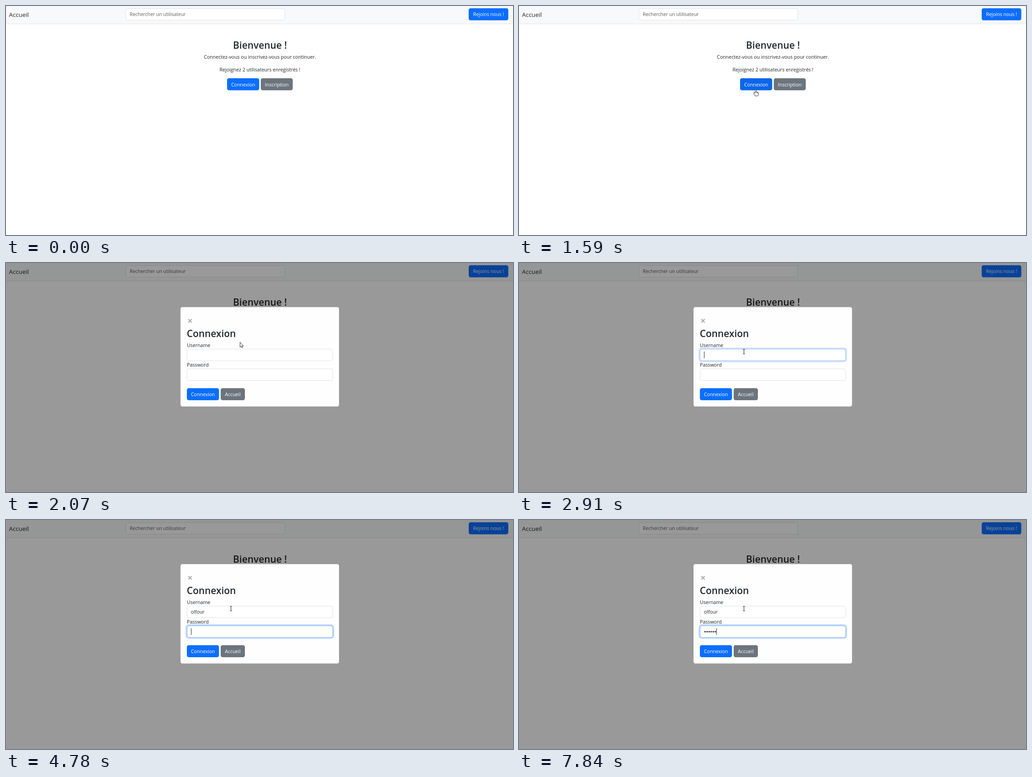
An HTML page that plays this animation: 1110 px wide and 504 px high, repeating every 8 s.

```html
<!DOCTYPE html>
<html lang="fr">
<head>
<meta charset="utf-8">
<title>Connexion</title>
<style>
  html, body { margin: 0; width: 100%; height: 100%; overflow: hidden; background: #fff; }
  svg { display: block; width: 1110px; height: 504px; }
  text { font: 10.6px "Open Sans", "Noto Sans", sans-serif; fill: #212529; white-space: pre; }
  .mid { text-anchor: middle; }
  .title { font-size: 20.9px; font-weight: 600; }
  .brand { font-size: 13.3px; }
  .hint { font-size: 10.45px; fill: #595c5f; }
  .light { fill: #fff; font-size: 10.5px; font-weight: 500; }
  .blue { fill: #0d6efd; }
  .gray { fill: #6c757d; }
  .field { fill: #fff; stroke: #dee2e6; }
  .ring { fill: none; stroke: #0d6efd; stroke-opacity: .25; stroke-width: 2.8; }
  .edge { fill: none; stroke: #86b7fe; }
  .cursor { fill: #fff; stroke: #000; stroke-width: .8; stroke-linejoin: round; }
</style>
</head>
<body>
<svg viewBox="0 0 1110 504">
  <defs>
    <filter id="soft" x="-5%" y="-20%" width="110%" height="150%">
      <feDropShadow dx="0" dy="1.4" stdDeviation="1.4" flood-color="#000" flood-opacity=".1"/>
    </filter>
  </defs>
  <rect width="1110" height="504" fill="#fff"/>
  <rect x="-10" y="-10" width="1130" height="47.6" fill="#f8f9fa" filter="url(#soft)"/>
  <text class="brand" x="6.5" y="23.5">Accueil</text>
  <rect class="field" x="262.5" y="5.5" width="348" height="25.7" rx="4"/>
  <text class="hint" x="271" y="22.4">Rechercher un utilisateur</text>
  <rect class="blue" x="1013" y="5" width="86.7" height="26.4" rx="4.2"/>
  <text class="mid light" x="1056.4" y="22.4">Rejoins nous !</text>

  <text class="title mid" x="556" y="93.5">Bienvenue !</text>
  <text class="mid" x="556" y="116">Connectez-vous ou inscrivez-vous pour continuer.</text>
  <text class="mid" x="556" y="144">Rejoignez 2 utilisateurs enregistrés !</text>
  <rect id="login" class="blue" x="484" y="159" width="70.3" height="26.5" rx="4.2"/>
  <text class="mid light" x="519.2" y="176.6">Connexion</text>
  <rect class="gray" x="557.8" y="159" width="70" height="26.5" rx="4.2"/>
  <text class="mid light" x="592.8" y="176.6">Inscription</text>

  <rect id="shade" width="1110" height="504" fill-opacity=".4"/>

  <g id="modal">
    <rect x="381.6" y="96.6" width="348.1" height="219.7" rx="4.8" fill="#fefefe" stroke="#888" stroke-width=".8"/>
    <path d="M399.2 123.6l7.4 7.4m0-7.4l-7.4 7.4" stroke="#aaa" stroke-width="2.1"/>
    <text class="title" x="395.8" y="162.5">Connexion</text>
    <text x="396" y="185">Username</text>
    <rect class="field" x="396.4" y="189.4" width="318.8" height="25.7" rx="4"/>
    <text x="396" y="228">Password</text>
    <rect class="field" x="396.4" y="232.8" width="318.8" height="25.7" rx="4"/>
    <g id="focusUser">
      <rect class="ring" x="394.6" y="187.6" width="322.3" height="29.2" rx="5.6"/>
      <rect class="edge" x="396.4" y="189.4" width="318.8" height="25.7" rx="4"/>
    </g>
    <g id="focusPass">
      <rect class="ring" x="394.6" y="231" width="322.3" height="29.2" rx="5.6"/>
      <rect class="edge" x="396.4" y="232.8" width="318.8" height="25.7" rx="4"/>
    </g>
    <text id="user" x="404.8" y="206.4"></text>
    <g id="dots" fill="#212529"></g>
    <rect id="caret" width="1" height="14.4" fill="#212529"/>
    <rect class="blue" x="396" y="275.4" width="70.3" height="26.5" rx="4.2"/>
    <text class="mid light" x="431.2" y="293">Connexion</text>
    <rect class="gray" x="470" y="275.4" width="53" height="26.5" rx="4.2"/>
    <text class="mid light" x="496.4" y="293">Accueil</text>
  </g>

  <circle id="click" r="8.5" fill="#f0f000" fill-opacity=".5"/>
  <path id="arrow" class="cursor" d="M.4.4V11.4L2.8 9.2 4.4 12.6 5.9 11.9 4.4 8.5H7.8Z"/>
  <g id="hand" class="cursor">
    <path d="M-1.2 9V1.1a1.2 1.2 0 0 1 2.4 0V6l1.9.4q.8-.2 1.6.5q1.3.1 1.5 1.5v3.4l-1.3 3.2H-.9L-4.4 9.2q-.3-1.6 1.2-1.4z"/>
    <path d="M1.2 6v2.6M3.1 6.4v2.4M4.7 6.9v2.2" fill="none" stroke-width=".6"/>
  </g>
  <path id="beam" fill="none" stroke="#000" stroke-width=".9"
    d="M-2.3-5H-.6L0-4.6.6-5H2.3M0-4.6V4.6M-2.3 5H-.6L0 4.6.6 5H2.3"/>
</svg>
<script>
const LOOP = 8000;
const NAME = "olfour";
const nameKeys = [3640, 3790, 3980, 4110, 4190, 4310];
const passKeys = [5810, 6190, 6640, 7040, 7380, 7840];
const DOT = 4.5;

// Pointer moves: start, end, steps, from, to, easing power for x and y
const moves = [
  { t0: 120, t1: 400, n: 5, from: [1061, 480], to: [878, 269], ease: [1.8, 1.8] },
  { t0: 740, t1: 1540, n: 13, from: [850, 263], to: [520, 187], ease: [3.4, 1.13] },
  { t0: 1590, t1: 2000, n: 7, from: [518, 183], to: [513.5, 174], ease: [2, 2] },
  { t0: 2070, t1: 2071, n: 2, from: [512, 174], to: [512, 174], ease: [1, 1] },
  { t0: 2510, t1: 2630, n: 3, from: [506, 181], to: [492.5, 195], ease: [1.3, 1] }
];

const ui = {};
document.querySelectorAll("[id]").forEach(el => ui[el.id] = el);

const dots = NAME.split("").map((_, i) => {
  const dot = document.createElementNS("http://www.w3.org/2000/svg", "circle");
  dot.setAttribute("cx", 407.3 + DOT * i);
  dot.setAttribute("cy", 245.8);
  dot.setAttribute("r", 1.65);
  return ui.dots.appendChild(dot);
});

const set = (el, name, value) => el.setAttribute(name, value);
const show = (el, on) => set(el, "visibility", on ? "inherit" : "hidden");
const within = (t, a, b) => t >= a && t < b;
const pressed = (keys, t) => keys.filter(k => k <= t).length;

// Progress from 0 to 1 in n held positions
function stepped(t, t0, t1, n) {
  const p = Math.min(1, Math.max(0, (t - t0) / (t1 - t0)));
  return Math.floor(p * (n - 1) + 1e-6) / (n - 1);
}

function pointerAt(t) {
  const m = moves.filter(move => move.t0 <= t).pop();
  if (!m) return null;
  const p = stepped(t, m.t0, m.t1, m.n);
  return m.from.map((a, i) => a + (m.to[i] - a) * (1 - Math.pow(1 - p, m.ease[i])));
}

function drawPointer(t) {
  const pos = pointerAt(t);
  const hand = within(t, 1590, 2070);
  const beam = t >= 2630;
  show(ui.arrow, pos && !hand && !beam);
  show(ui.hand, hand);
  show(ui.beam, beam);
  if (pos) {
    for (const el of [ui.arrow, ui.hand, ui.beam]) set(el, "transform", `translate(${pos})`);
  }
  show(ui.click, within(t, 1930, 2070) || within(t, 2790, 2910));
  set(ui.click, "transform", t < 2070 ? "translate(512 173.7)" : "translate(492.5 195)");
}

function drawForm(t) {
  const inUser = within(t, 2790, 4660);
  const inPass = t >= 4660;
  const userGlow = t < 2790 ? 0 : 0.25 + 0.75 * stepped(t, 2790, 2970, 4);
  const passGlow = t < 4660 ? 0 : 0.3 + 0.7 * stepped(t, 4660, 4780, 3);
  set(ui.focusUser, "opacity", inPass ? 1 - passGlow : userGlow);
  set(ui.focusPass, "opacity", passGlow);

  ui.user.textContent = NAME.slice(0, pressed(nameKeys, t));
  const count = pressed(passKeys, t);
  dots.forEach((dot, i) => show(dot, i < count));

  const blinkOff = within(t, 3390, 3640) || within(t, 5200, 5710);
  show(ui.caret, (inUser || inPass) && !blinkOff);
  const typed = inPass ? count * DOT : ui.user.getComputedTextLength();
  set(ui.caret, "x", Math.floor(405.2 + typed));
  set(ui.caret, "y", inPass ? 238.4 : 195);
}

function draw(t) {
  const open = t >= 2070;
  const hover = within(t, 1590, 2070);
  ui.login.style.fill = hover ? (t < 1650 ? "#0c66ea" : "#0b5ed7") : "#0d6efd";
  show(ui.shade, open);
  show(ui.modal, open);
  drawForm(t);
  drawPointer(t);
}

const start = performance.now();
function frame() {
  draw((performance.now() - start) % LOOP);
  requestAnimationFrame(frame);
}
draw(0);
requestAnimationFrame(frame);
</script>
</body>
</html>
```
